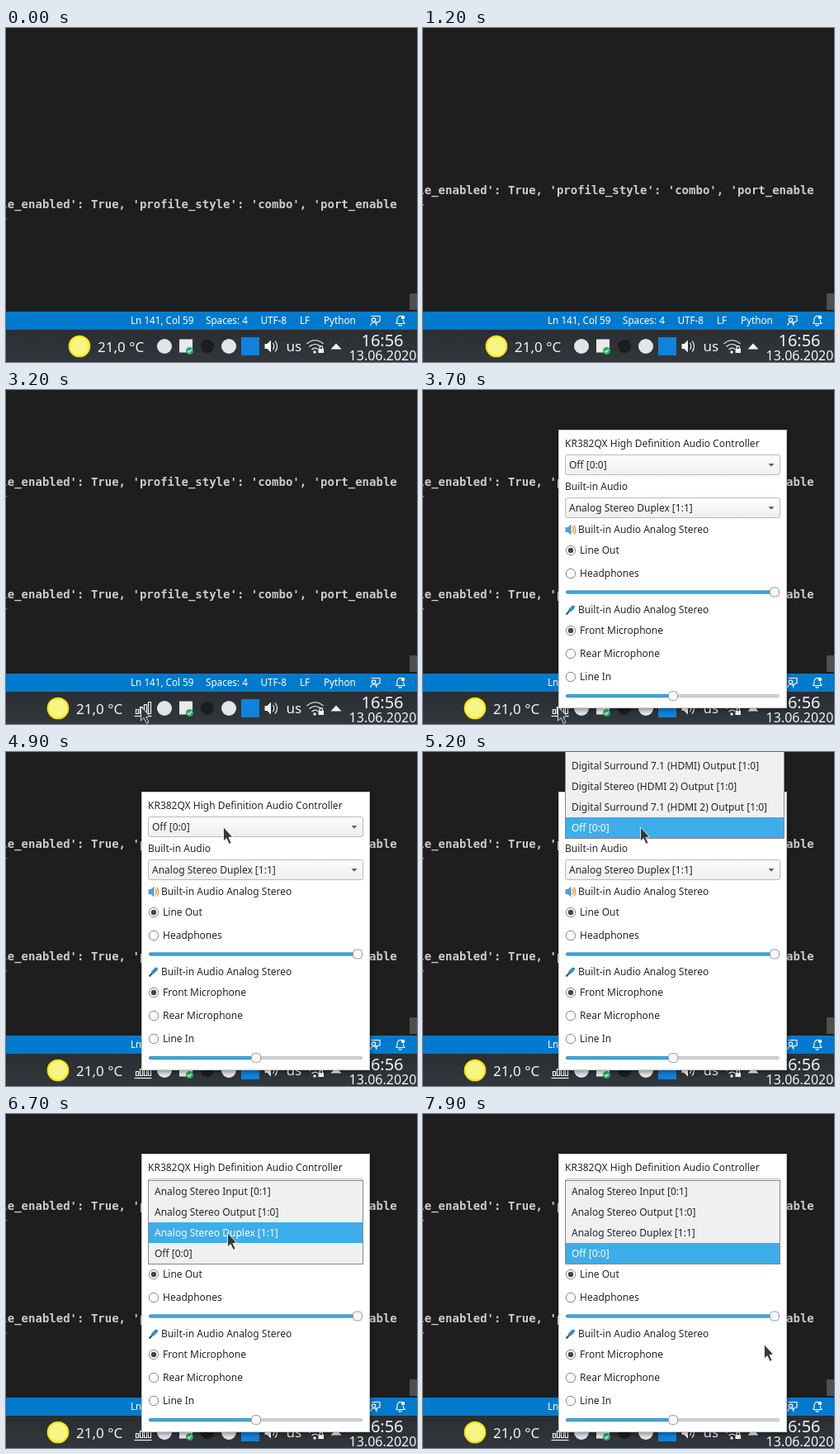
These frames come from a looping animation (498x404 px, 8000 ms). An HTML page:

```html
<!DOCTYPE html>
<html lang="en">
<head>
<meta charset="utf-8">
<title>Mixer popup</title>
<style>
html, body { margin: 0; width: 100%; height: 100%; overflow: hidden; background: #1e1e1e; }
svg { display: block; }
text { font: 12px "Noto Sans", "Open Sans", sans-serif; fill: #232629; white-space: pre; }
.code { font: bold 14px "DejaVu Sans Mono", monospace; fill: #cccccc; }
.status text { font-size: 11.7px; fill: #fff; }
.panel text { font-size: 17px; fill: #f4f5f6; }
.panel .time { font-size: 20px; text-anchor: middle; }
.panel .date { font-size: 16px; text-anchor: middle; }
.line { fill: none; stroke: #f4f5f6; stroke-width: 1.2; }
text.on { fill: #fff; }
#popup { filter: drop-shadow(2px 3px 2px rgba(0, 0, 0, .3)); }
</style>
</head>
<body>
<svg id="stage" width="498" height="404" viewBox="0 0 498 404"></svg>
<script>
const text = (x, y, s, cls = '') => `<text x="${x}" y="${y}" class="${cls}">${s}</text>`;
const rect = (x, y, w, h, fill, more = '') =>
  `<rect x="${x}" y="${y}" width="${w}" height="${h}" fill="${fill}" ${more}/>`;
const circle = (x, y, r, fill, more = '') => `<circle cx="${x}" cy="${y}" r="${r}" fill="${fill}" ${more}/>`;
const path = (d, more = 'class="line"') => `<path d="${d}" ${more}/>`;
const group = (id, body, cls = '') => `<g id="${id}" class="${cls}">${body}</g>`;

const code = id => group(id,
  text(-6.7, 5, "le_enabled': True, 'profile_style': 'combo', 'port_enable", 'code') +
  rect(0, 17, 1, 1.5, '#a3a36c'));

const status = group('status',
  rect(0, 343, 498, 22, '#007acc') +
  text(151, 358, 'Ln 141, Col 59') + text(242, 358, 'Spaces: 4') +
  text(308.5, 358, 'UTF-8') + text(356, 358, 'LF') + text(385, 358, 'Python') +
  path('M442.5 348.5h10.5v6.5h-2l-2.5 2.5v-2.500M442 360c0-3 1.500-4 3.500-4s3.500 1 3.500 4') +
  circle(445.5, 353, 2.2, '#007acc', 'class="edge" stroke="#fff" stroke-width="1.2"') +
  path('M472.500 357.500h10.500l-1.500-2.500v-2M480 348.700c-3-1.200-6 .5-6 3.800v2.500l-1.500 2.500M476 358.500a1.700 1.700 0 0 0 3.400 0') +
  circle(481, 350, 2.2, '#fff'), 'status');

const bars = [0, 1, 2, 3].map(i => `M${157.5 + i * 5} 391.500v${-5 - i * 3}h3v${5 + i * 3}z`).join('');

const panel = group('panel',
  rect(0, 365, 498, 39, 'url(#panelFill)') +
  group('weather',
    circle(89, 385, 12.3, '#f7f583', 'stroke="#fbe40a" stroke-width="2"') +
    text(111, 392, '21,0 °C')) +
  group('mixer', path(bars) + path('M155.500 394.500h21')) +
  circle(192, 385, 9, '#dfe4ec') +
  rect(210, 376.500, 16, 16, '#e8eaec') + circle(222.500, 390.500, 4.500, '#27ae60') +
  path('M220.300 390.500l1.700 1.800 2.800-3.400') +
  circle(244, 385, 8, '#1b1d1f') +
  circle(270, 385, 9, '#e3e5e7') +
  rect(285, 374, 22, 22, '#0e82dc') +
  path('M313.500 382h3l4.500-4.500v15l-4.500-4.500h-3z', 'fill="#f4f5f6"') +
  path('M323.500 381q2.500 4 0 8M326 378.500q5 6.500 0 13') +
  text(339.5, 391, 'us') +
  path('M364.500 382q10-8.500 20 0M367.500 385.500q7-6 14 0M370.500 389q4-3.500 7.500-.500') +
  circle(374, 392, 1.700, '#f4f5f6') +
  rect(378.500, 388, 6.500, 5, '#f4f5f6') + path('M380 388v-1.500a1.800 1.800 0 0 1 3.600 0v1.500') +
  path('M393.500 388.500l6.500-7 6.500 7z', 'fill="#f4f5f6"') +
  text(456, 384.500, '16:56', 'time') + text(456.5, 402, '13.06.2020', 'date'), 'panel');

const combo = (y, label) =>
  rect(172.5, y + .5, 260, 24, 'url(#button)', 'rx="2.5" stroke="#b9bbbd"') +
  text(177, y + 17, label) +
  path(`M418.500 ${y + 11}h7l-3.500 3.800z`, 'fill="#5d6164"');

const radio = (y, label, on) =>
  circle(179, y, 5.7, '#fcfcfc', 'stroke="#85888b"') +
  (on ? circle(179, y, 3.2, '#44484c') : '') + text(190, y + 4.3, label);

const slider = (y, x) =>
  rect(173.5, y - 1.5, 258, 3, '#d3d5d6', 'rx="1.5" stroke="#bfc1c3"') +
  rect(173.5, y - 1.5, x - 173.5, 3, '#3daee9', 'rx="1.5" stroke="#2d88ba"') +
  rect(x - 5.5, y - 5.5, 11, 11, '#f8f8f9', 'rx="4" stroke="#989b9e"');

const popup = group('popup',
  rect(164.5, 48.5, 276, 336, '#fff', 'stroke="#c4c7c9"') +
  text(172, 69, 'KR382QX High Definition Audio Controller') + combo(78, 'Off [0:0]') +
  text(172, 121, 'Built-in Audio') + combo(130, 'Analog Stereo Duplex [1:1]') +
  path('M172.500 166h3l4-3.500v13l-4-3.500h-3z', 'fill="#4d9fd6"') +
  path('M181 165.500q2.500 3.500 0 7M183 163.500q3.500 5.500 0 11', 'fill="none" stroke="#f39a2e" stroke-width="1.500"') +
  text(188, 173, 'Built-in Audio Analog Stereo') +
  radio(194, 'Line Out', true) + radio(222, 'Headphones') + slider(244.5, 426) +
  path('M173.500 271.500l5.500-6', 'stroke="#44484c" stroke-width="2"') +
  path('M178 266.500l4-4', 'stroke="#2f8fc8" stroke-width="4" stroke-linecap="round"') +
  text(188, 270, 'Built-in Audio Analog Stereo') +
  radio(291, 'Front Microphone', true) + radio(319, 'Rear Microphone') + radio(347, 'Line In') +
  slider(370, 303));

// Drop-down of 25 px rows; "pick" is the highlighted row
const list = (id, top, width, rows, pick) => group(id,
  rect(172.5, top - .5, width, rows.length * 25 + 1, '#eff0f1', 'stroke="#85898c"') +
  rect(173, top + pick * 25, width - 1, 25, '#3daee9') +
  rows.map((s, i) => text(180, top + i * 25 + 17, s, i === pick ? 'on' : '')).join(''));

const digital = ['Stereo (HDMI)', 'Surround 5.1 (HDMI)', 'Surround 7.1 (HDMI)', 'Stereo (HDMI 2)', 'Surround 7.1 (HDMI 2)']
  .map(s => `Digital ${s} Output [1:0]`);
const analog = ['Input [0:1]', 'Output [1:0]', 'Duplex [1:1]'].map(s => 'Analog Stereo ' + s);

const beam = 'M-3.500-8.500q3.500 0 3.500 2q0-2 3.500-2M0-7v14M-3.500 8.500q3.500 0 3.500-2q0 2 3.500 2';
const stage = document.getElementById('stage');
stage.innerHTML = `<defs>
  <linearGradient id="panelFill" x2="0" y2="1"><stop stop-color="#2a2e32"/><stop offset="1" stop-color="#32373c"/></linearGradient>
  <linearGradient id="button" x2="0" y2="1"><stop stop-color="#fcfcfc"/><stop offset="1" stop-color="#eeeff0"/></linearGradient>
  </defs>` +
  rect(0, 0, 498, 404, '#1e1e1e') + code('older') + code('newer') +
  rect(489, 321, 9, 20, '#4f4f4f') + status + panel + popup +
  list('cards', -46, 265, [...digital, 'Off [0:0]'], 5) +
  list('duplex', 81, 260, [...analog, 'Off [0:0]'], 2) +
  list('off', 81, 260, [...analog, 'Off [0:0]'], 3) +
  group('beam', path(beam, 'fill="none" stroke="#fff" stroke-width="3"') +
    path(beam, 'fill="none" stroke="#222" stroke-width="1"')) +
  group('arrow', path('M.500 .800v17.200l3.600-3.400 3.200 6.700 2.800-1.300-3.200-6.500 4.600-.8z',
    'fill="#35393d" stroke="#fff" stroke-width=".8"'));

// Pointer path: time, x, y
const moves = [
  [2000, 4, 121], [2100, 62, 214], [2200, 104, 278], [2300, 127, 316], [2500, 138, 344], [2800, 153, 377],
  [3200, 163, 382], [3900, 163, 382], [4000, 190, 345], [4200, 288, 210], [4300, 308, 155],
  [4400, 288, 106], [4600, 179, 61], [4700, 179, 61], [4800, 232, 79], [4900, 263, 90],
  [6000, 263, 90], [6100, 263, 96], [6500, 268, 143], [7600, 268, 143],
  [7700, 345, 168], [7800, 451, 321], [7900, 413, 278]];

function pointer(t) {
  const i = moves.findLastIndex(m => m[0] <= t);
  const a = moves[i], b = moves[i + 1] || a;
  const k = b === a ? 0 : (t - a[0]) / (b[0] - a[0]);
  return [a[1] + (b[1] - a[1]) * k, a[2] + (b[2] - a[2]) * k].map(Math.round);
}

const el = id => document.getElementById(id);
const show = (id, on) => el(id).style.display = on ? '' : 'none';
const place = (id, x, y) => el(id).setAttribute('transform', `translate(${x} ${y})`);

function draw(now) {
  const t = Math.floor(now % 8000 / 100) * 100;
  place('older', 0, t < 1200 ? 213 : t < 1400 ? 196 : 111);
  place('newer', 0, 247);
  show('newer', t >= 1400);
  place('weather', t < 1500 ? 0 : -26, 0);
  show('mixer', t >= 1500);
  show('popup', t >= 3700);
  show('cards', t >= 5100 && t < 6100);
  show('duplex', t >= 6600 && t < 7700);
  show('off', t >= 7700);

  const [x, y] = t < 2000 ? [-50, 0] : pointer(t);
  const typing = t < 3700 && y < 343;
  show('beam', typing);
  show('arrow', !typing);
  place('beam', x, y);
  place('arrow', x, y);
  requestAnimationFrame(draw);
}

const start = performance.now();
requestAnimationFrame(() => draw(0));
function draw0() {}
</script>
<script>
// Time runs from page load
{
  const paint = draw;
  draw = () => paint(Math.max(0, performance.now() - start));
}
</script>
</body>
</html>
```
